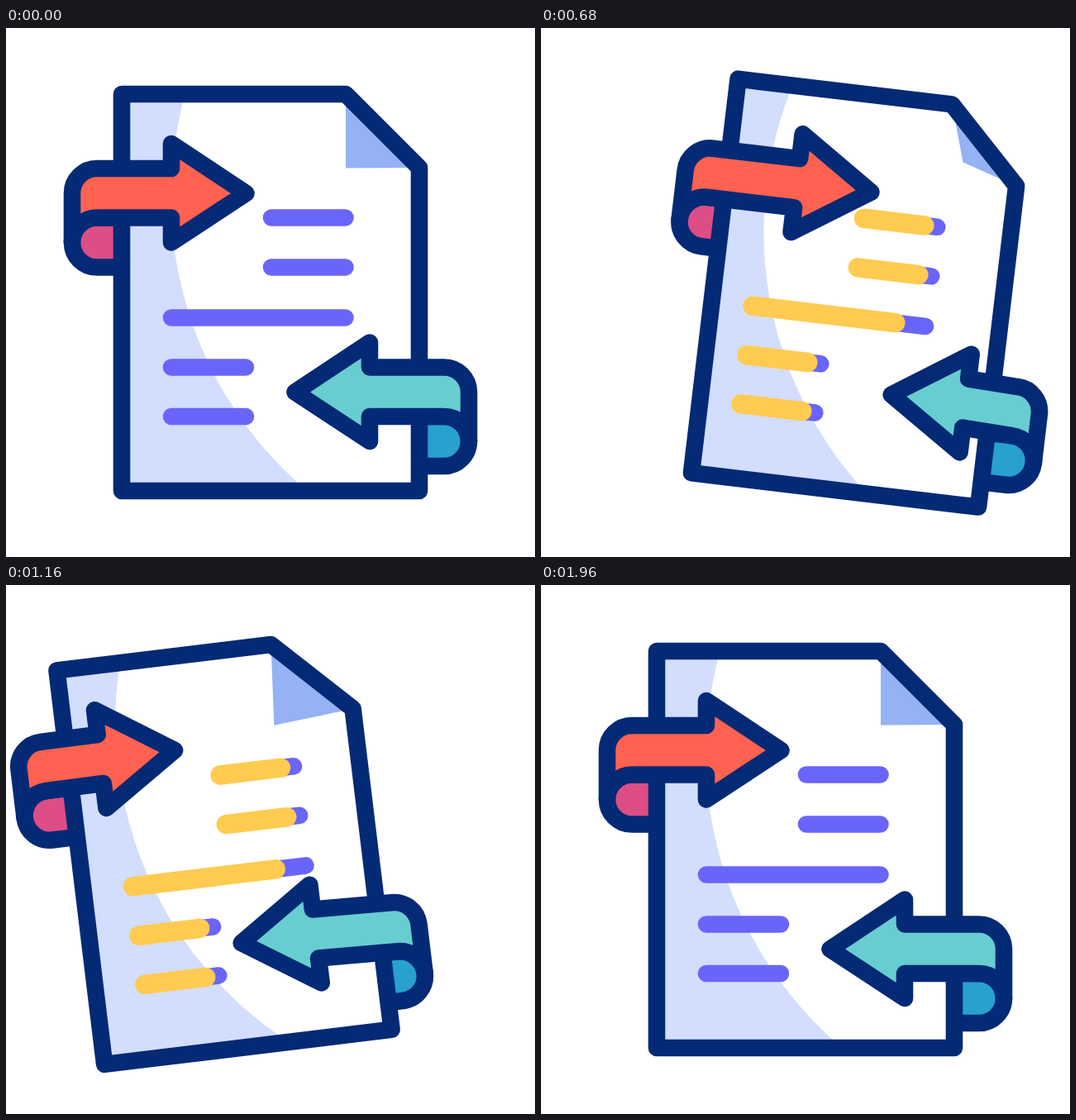
Animation, 640 px wide and 640 px high, one loop 2 s. Source, as an HTML page:

```html
<!DOCTYPE html>
<html lang="en">
<head>
<meta charset="utf-8">
<title>Document exchange</title>
<style>
  html, body { margin: 0; width: 100%; height: 100%; overflow: hidden; background: #fff; }
  svg { display: block; width: 100vw; height: 100vh; }
  .ink { stroke: #042a75; stroke-width: 20.6; stroke-linejoin: round; }
  .bar { stroke: #6a65fa; stroke-width: 20.6; stroke-linecap: round; }
  .fill { stroke: #ffcb50; stroke-width: 23.5; stroke-linecap: round; }
</style>
</head>
<body>
<svg viewBox="0 0 640 640">
  <defs><clipPath id="inside"><path class="page"/></clipPath></defs>
  <g id="scene">
    <path id="redBack" class="ink" fill="#dd4d86"/>
    <g transform="translate(640 240.5) scale(-1 1)"><path id="tealBack" class="ink" fill="#28a1ce"/></g>
    <path class="page" fill="#d3ddfd"/>
    <circle cx="664.5" cy="205" r="465" fill="#fff" clip-path="url(#inside)"/>
    <path id="fold" fill="#94b2f4"/>
    <path class="page ink" fill="none"/>
    <g id="lines"></g>
    <path id="redFront" class="ink" fill="#ff6250"/>
    <g transform="translate(640 240.5) scale(-1 1)"><path id="tealFront" class="ink" fill="#68cdd1"/></g>
  </g>
</svg>
<script>
const LOOP = 2000, STEP = 40;
const $ = id => document.getElementById(id);
const draw = (id, d) => $(id).setAttribute('d', d);

// Text lines: x start, x end, y
const bars = [
  [321, 410.5, 229.5], [321, 410.5, 289.5], [200, 410.5, 350.5],
  [200, 290, 410.5], [200, 290, 470]
].map(([x1, x2, y]) => {
  const line = cls => {
    const el = document.createElementNS('http://www.w3.org/2000/svg', 'path');
    el.setAttribute('class', cls);
    el.setAttribute('d', `M${x1} ${y}H${x2}`);
    $('lines').append(el);
    return el;
  };
  line('bar');
  return { x1, x2, y, el: line('fill') };
});

// Eased value that passes through the given values at the given times
function track(t, times, values) {
  if (t <= times[0]) return values[0];
  for (let i = 1; i < times.length; i++) {
    if (t < times[i]) {
      const u = (t - times[i - 1]) / (times[i] - times[i - 1]);
      return values[i - 1] + (values[i] - values[i - 1]) * u * u * (3 - 2 * u);
    }
  }
  return values[values.length - 1];
}

// Head and curl of the ribbon arrow move apart; the curl's end hides behind the page edge
function arrow(name, head, headY, curl, curlY, edge) {
  const x = curl + 110, left = curl + 80, hx = head + 200;
  const y = v => v + curlY, hy = v => v + headY;
  draw(name + 'Back', `M${edge} ${y(229.5)}H${x}A30 30 0 0 0 ${left} ${y(259.5)}
    A30 30 0 0 0 ${x} ${y(289.5)}H${edge}`);
  draw(name + 'Front', `M${x} ${y(170)}L${hx} ${hy(170)}V${hy(140)}L${head + 290.5} ${hy(200)}
    L${hx} ${hy(259.5)}V${hy(229.5)}L${x} ${y(229.5)}A30 30 0 0 0 ${left} ${y(259.5)}
    V${y(200)}A30 30 0 0 1 ${x} ${y(170)}Z`);
}

function render(t) {
  const turn = (a, b) => track(t, [120, 640, 1160, 1945], [0, a, b, 0]);
  const slide = (a, b) => track(t, [120, 660, 1160, 1945], [0, a, b, 0]);

  const shift = track(t, [200, 636, 1160, 1775], [0, 61, -51, 0]);
  $('scene').setAttribute('transform', `translate(${shift} 0) rotate(${turn(7, -6.9)} 320 320)`);

  const left = 140 + turn(10.5, 0), inset = turn(0, 10), right = 500 - inset;
  const page = `M${left} 80H${right - 89}L${right} 169V560H${left}Z`;
  document.querySelectorAll('.page').forEach(el => el.setAttribute('d', page));

  const peel = turn(22, -8);
  draw('fold', `M${right - 89} 80L${right - 89 + peel} ${169.5 - peel}L${right} 169Z`);

  arrow('red', slide(36, -20.5), slide(-3, -7), slide(20, 0), slide(-3, -6.5), left);
  arrow('teal', slide(-30, 27.5), slide(-3, -6.3), slide(0, 22), slide(-0.5, -3), 140 + inset);

  const amount = track(t, [120, 882, 1930], [0, 1, 0]);
  for (const { x1, x2, y, el } of bars) {
    el.setAttribute('visibility', amount > 0 ? 'visible' : 'hidden');
    el.setAttribute('d', `M${x1} ${y}H${x1 + (x2 - x1) * amount + 0.01}`);
  }
}

const start = performance.now();
function tick() {
  const t = (performance.now() - start) % LOOP;
  render(Math.floor(t / STEP) * STEP);
  requestAnimationFrame(tick);
}
tick();
</script>
</body>
</html>
```
